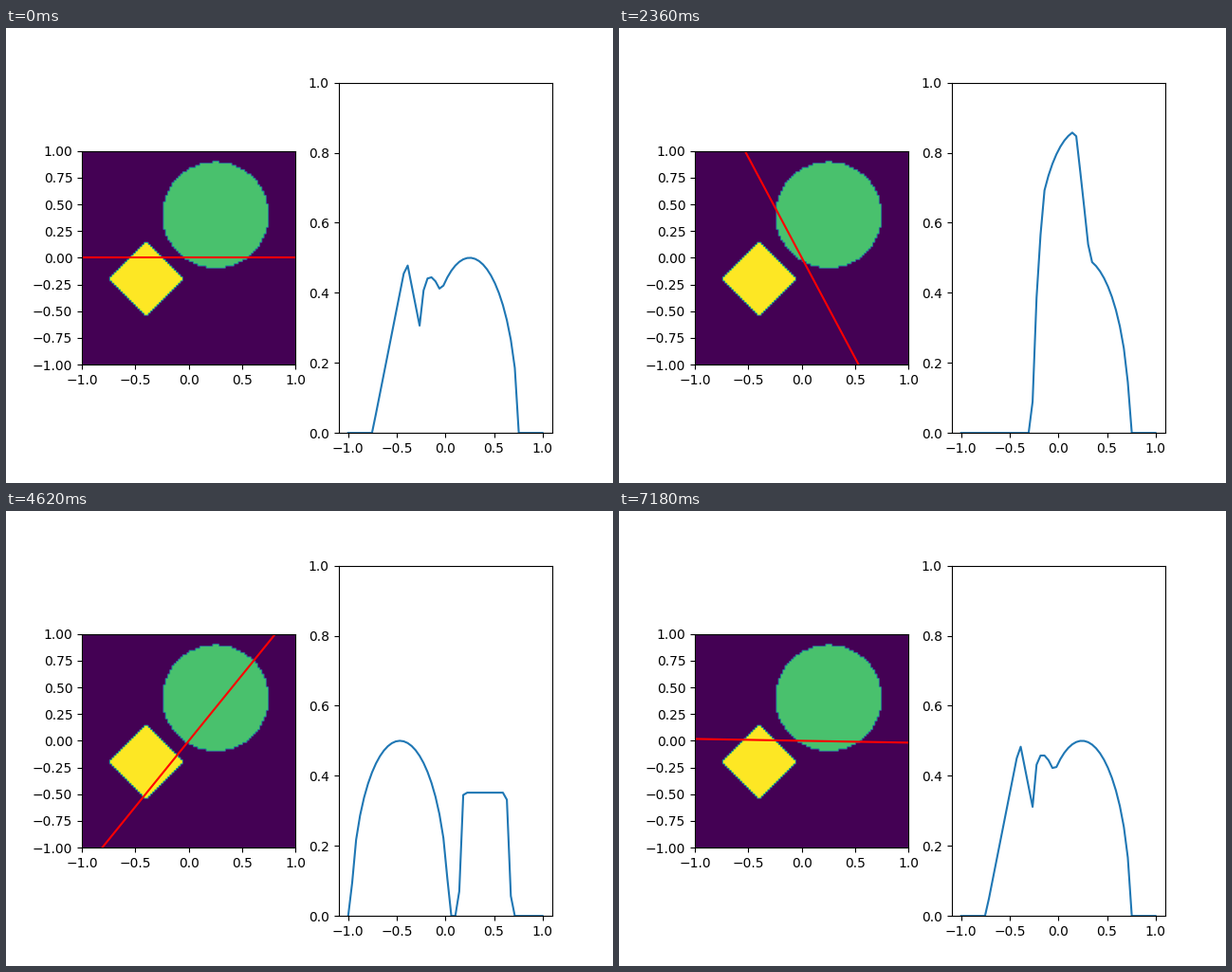
A matplotlib script that plays this animation: 640 px wide and 480 px high, repeating every 7200 ms.

```python
import numpy as np
import matplotlib.pyplot as plt
from matplotlib.animation import FuncAnimation

FRAMES = 360
DISC = dict(x=0.25, y=0.4, r=0.5, density=0.5)
DIAMOND = dict(x=-0.4, y=-0.2, side=0.5, density=0.7)


def phantom(n=100):
    """Density map of a disc and a square standing on its corner."""
    x, y = np.meshgrid(np.linspace(-1, 1, n), np.linspace(-1, 1, n))
    disc = np.hypot(x - DISC["x"], y - DISC["y"]) < DISC["r"]
    reach = np.abs(x - DIAMOND["x"]) + np.abs(y - DIAMOND["y"])
    diamond = reach < DIAMOND["side"] / np.sqrt(2)
    return DISC["density"] * disc + DIAMOND["density"] * diamond


def offset(shape, s, angle):
    """Distance of detector positions from the projected shape centre."""
    return np.abs(s - shape["x"] * np.cos(angle) - shape["y"] * np.sin(angle))


def disc_chord(s, angle):
    d = offset(DISC, s, angle)
    return 2 * np.sqrt(np.clip(DISC["r"] ** 2 - d ** 2, 0, None))


def diamond_chord(s, angle):
    """The shadow of a tilted square is a trapezoid."""
    d = offset(DIAMOND, s, angle)
    side = DIAMOND["side"]
    c = np.abs(np.cos(angle - np.pi / 4))
    k = np.abs(np.sin(angle - np.pi / 4))
    long, short = max(c, k), min(c, k)
    top = side / long
    if short < 1e-9:
        return np.where(d < side / 2, top, 0.0)
    slope = (side / 2 * (long + short) - d) / (long * short)
    return np.clip(slope, 0, top)


def projection(s, angle):
    return (DISC["density"] * disc_chord(s, angle)
            + DIAMOND["density"] * diamond_chord(s, angle))


fig, (scene, plot) = plt.subplots(1, 2, figsize=(6.4, 4.8), dpi=100)

scene.imshow(phantom(), extent=(-1, 1, -1, 1), origin="lower")
ray, = scene.plot([], [], "r-")
scene.set(xlim=(-1, 1), ylim=(-1, 1))

s = np.linspace(-1, 1, 50)
curve, = plot.plot(s, projection(s, 0))
plot.set(xlim=(-1.1, 1.1), ylim=(0, 1))


def update(i):
    angle = 2 * np.pi * i / FRAMES
    ends = np.array([-1.5, 1.5])
    ray.set_data(ends * np.cos(angle), ends * np.sin(angle))
    curve.set_ydata(projection(s, angle))
    return ray, curve


anim = FuncAnimation(fig, update, frames=FRAMES, interval=20,
                     repeat=True, repeat_delay=0)
plt.show()
```
